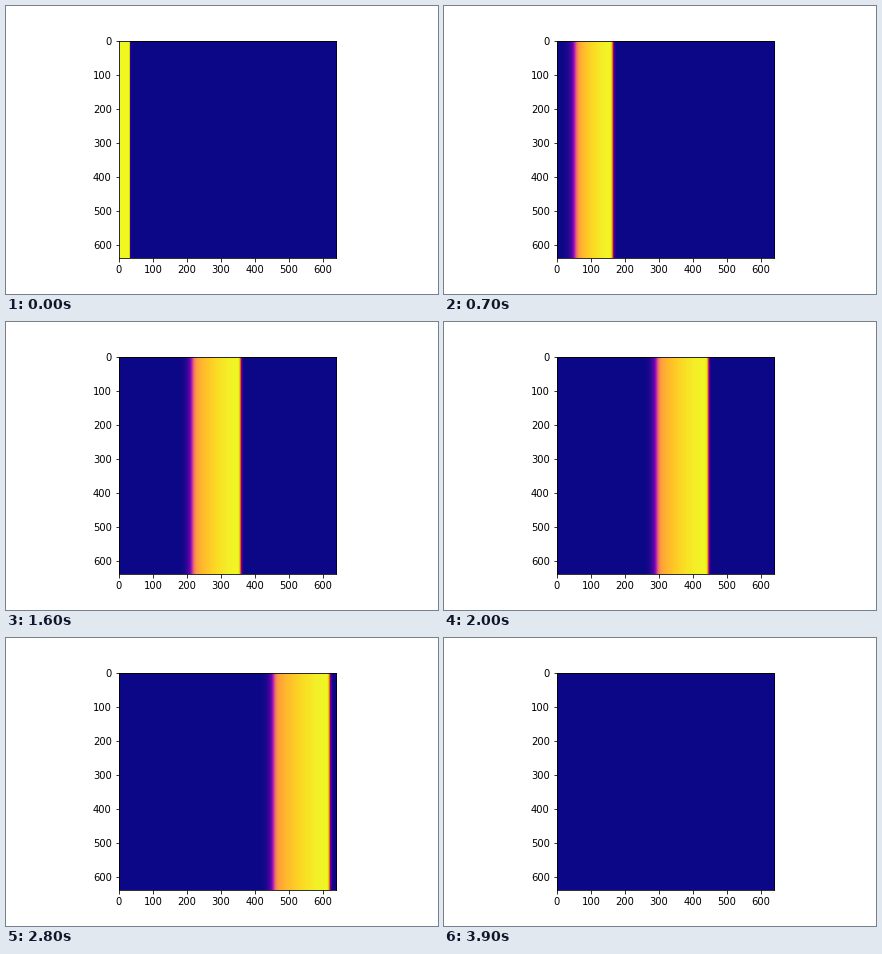
Animation of 432 by 288 pixels, one loop 4.8 s. Source, as a matplotlib script:

```python
import numpy as np
import matplotlib.pyplot as plt
from matplotlib.animation import FuncAnimation

SIZE = 640
FRAMES = 48
SPEED = 21.8  # final wave speed, cells per frame

x = np.arange(SIZE)
times = np.arange(FRAMES + 1)


def front(t):
    """Leading edge: starts at the excited strip and settles to SPEED."""
    return SPEED * t + 7.5 + 24 * np.exp(-t / 3.5)


def back(t):
    """Trailing edge: the pulse widens until both edges move alike."""
    return SPEED * t - 177 + 120 * np.exp(-t / 15)


def sigmoid(z):
    return 1 / (1 + np.exp(-np.clip(z, -60, 60)))


# Moments at which each cell gets excited and recovers.
excited = np.interp(x, front(times), times)
recovered = np.interp(x, back(times), times)


def potential(t):
    """Excitation along x at time t, from 0 (rest) to 1."""
    age = np.clip((t - excited) / (recovered - excited), 0, 1)
    plateau = 1 - 0.06 * age - 0.19 * age**2
    behind = x - back(t)
    tail = sigmoid(behind / np.where(behind < 0, 6.5, 4))
    edge = 1.8 if t else 0.1  # the strip starts with a hard edge
    return plateau * tail * sigmoid((front(t) - x) / edge)


def sheet(t):
    return np.tile(potential(t), (SIZE, 1))


fig = plt.figure(figsize=(6, 4), dpi=72, facecolor="white")
fig.subplots_adjust(left=0.125, right=0.9, bottom=0.125, top=0.88)
ax = fig.add_subplot()
image = ax.imshow(sheet(0), cmap="plasma", vmin=0, vmax=1)


def update(t):
    image.set_data(sheet(t))
    return [image]


anim = FuncAnimation(fig, update, frames=FRAMES, interval=100, repeat=True,
                     repeat_delay=0, init_func=lambda: update(0))
plt.show()
```
